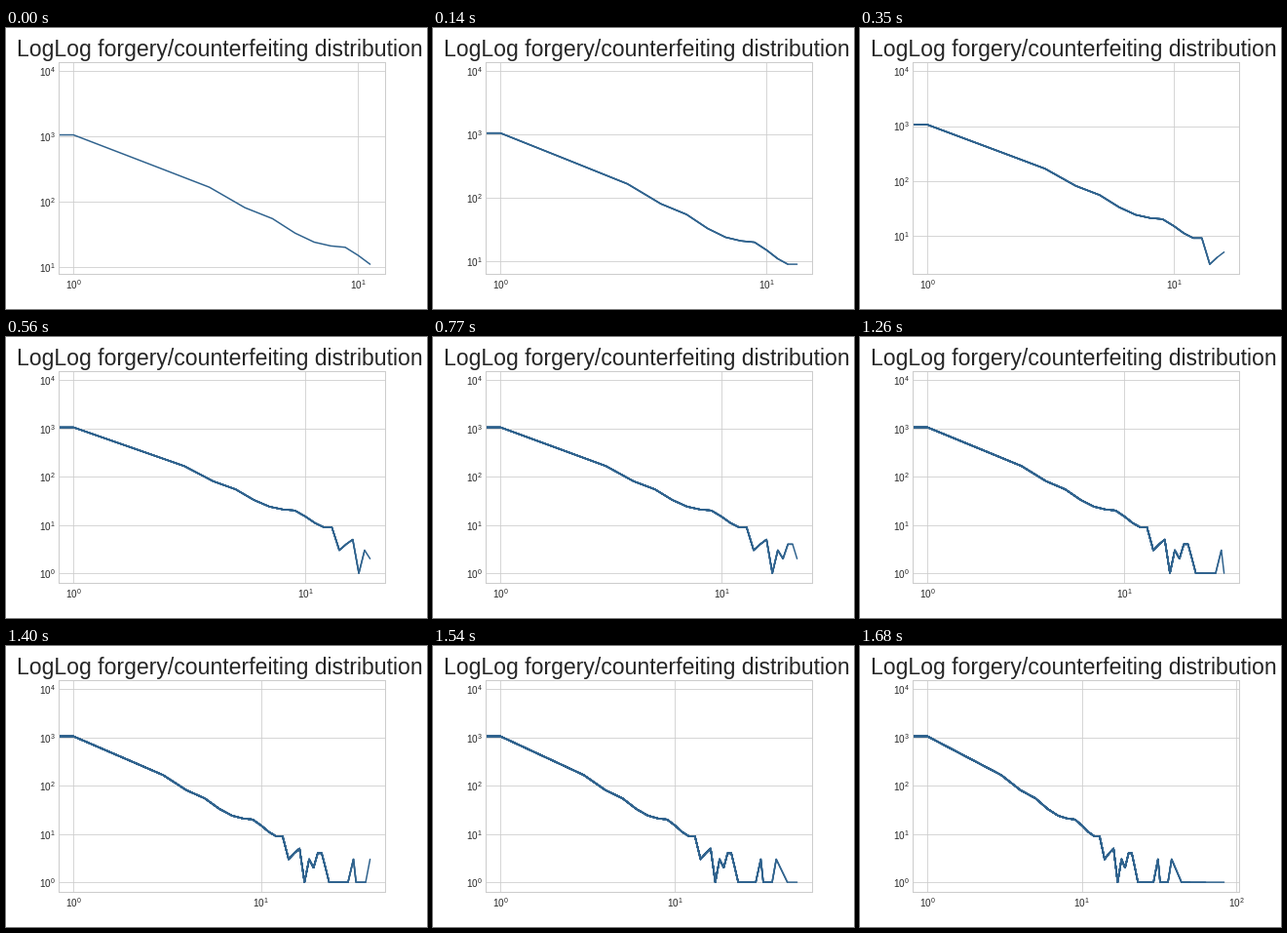
A matplotlib script for the animation above (2450 ms loop, 432 by 288 pixels).

```python
import numpy as np
import matplotlib.pyplot as plt
from matplotlib.animation import FuncAnimation

W, H, DPI = 432, 288, 72
STEP_MS, FRAMES = 70, 35
FIRST = 12          # points shown at the start
BLUE, DARK, LIGHT = "#30638e", "0.15", "0.8"

plt.rcParams.update({
    "font.family": "Liberation Sans",
    "font.size": 10,
    "text.color": DARK,
    "axes.edgecolor": LIGHT,
    "axes.linewidth": 1,
    "axes.axisbelow": True,
    "grid.color": LIGHT,
    "grid.linewidth": 0.8,
    "lines.linewidth": 1.5,
    "lines.solid_capstyle": "round",
    "xtick.color": DARK,
    "ytick.color": DARK,
    "xtick.major.size": 0,
    "ytick.major.size": 0,
    "xtick.major.pad": 4.5,
})

# Group size against number of groups; size 0 falls off the log axis.
sizes = np.array([*range(26), 27, 29, 31, 32, 36, 38, 44, 50, 63, 83])
counts = np.ones(len(sizes))
counts[:23] = [9990, 1060, 331, 167, 81, 55, 33, 24, 21, 20, 15, 11,
               9, 9, 3, 4, 5, 1, 3, 2, 4, 4, 2]
counts[np.isin(sizes, (31, 38))] = 3


def padded(low, high, margin=0.05):
    """Axis limits with a margin measured in decades."""
    a, b = np.log10([low, high])
    pad = margin * (b - a)
    return 10 ** (a - pad), 10 ** (b + pad)


fig = plt.figure(figsize=(W / DPI, H / DPI), dpi=DPI, facecolor="white")
ax = fig.add_axes([0.125, 0.125, 0.775, 0.755])
ax.set_xscale("log")
ax.set_yscale("log")
ax.minorticks_off()
ax.grid(True)
fig.text(219.5 / W, 259 / H, "LogLog forgery/counterfeiting distribution",
         size=23, ha="center", va="baseline")

# Every step lays a longer curve over the ones before it.
curves = [ax.plot(sizes[:n], counts[:n], color=BLUE)[0]
          for n in range(FIRST, len(sizes) + 1)]


def update(frame):
    step = min(frame, len(curves) - 1)
    n = FIRST + step
    for i, curve in enumerate(curves):
        curve.set_visible(i <= step)
    ax.set_xlim(padded(1, sizes[n - 1]))
    ax.set_ylim(padded(counts[:n].min(), counts[0]))
    return curves


anim = FuncAnimation(fig, update, frames=FRAMES, interval=STEP_MS,
                     repeat=True, repeat_delay=0, blit=False)
plt.show()
```
